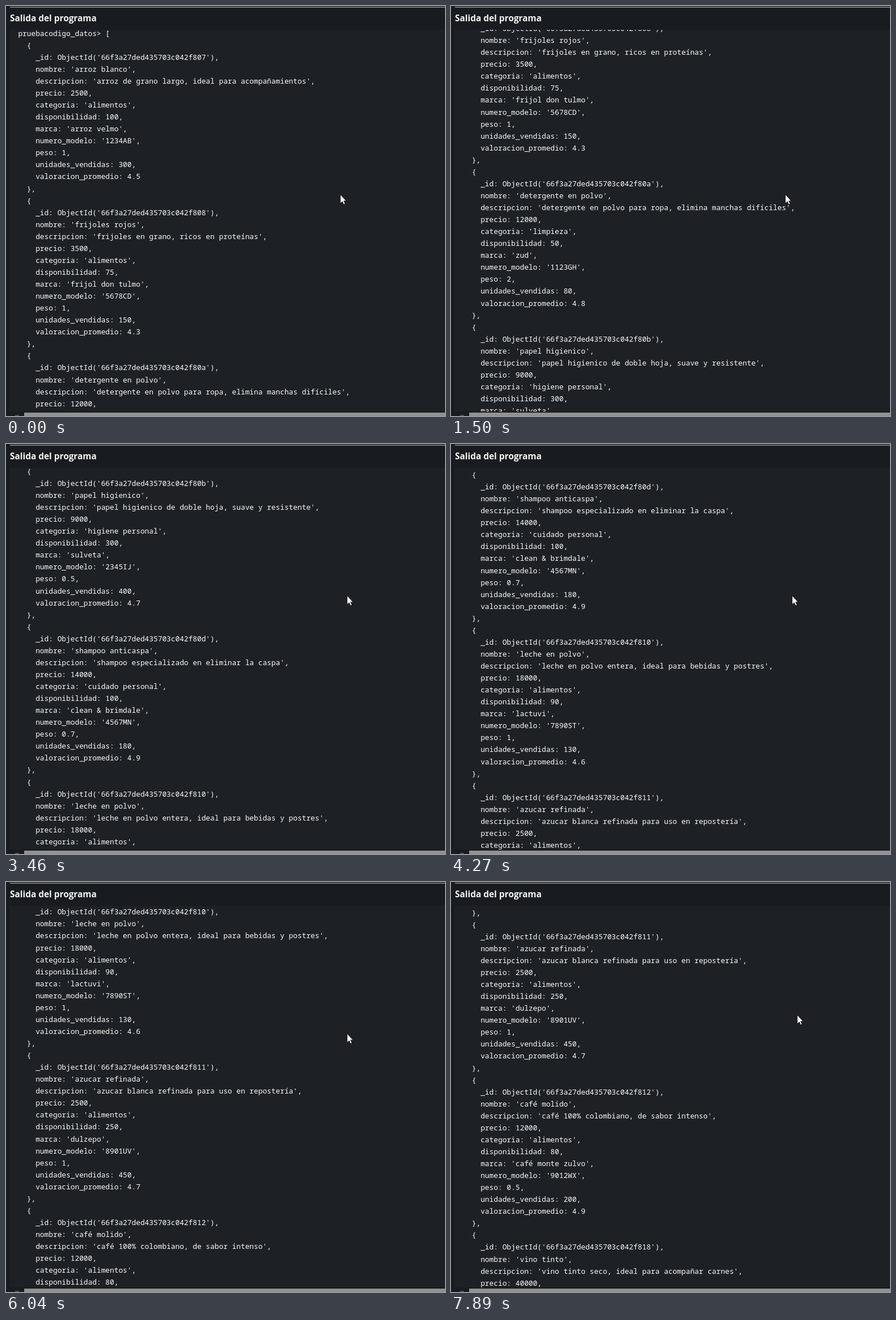
An HTML page for the animation above (8000 ms loop, 774 by 723 pixels).

```html
<!DOCTYPE html>
<html lang="es">
<head>
<meta charset="utf-8">
<style>
  html, body { margin: 0; width: 100%; height: 100%; overflow: hidden; background: #181b1f; }
  body { position: relative; }
  body > * { position: absolute; }
  #rule { left: 7px; right: 0; top: 1px; height: 1px; background: #8d9090; border-top: 1px solid #55595a; }
  h1 { margin: 0; left: 7px; top: 10px; font: 700 15.4px/24px "Open Sans", "Noto Sans", sans-serif; color: #f4f4f4; white-space: nowrap; }
  #output { left: 6px; right: 0; top: 42px; height: 673px; overflow: hidden; background: #1d2125; }
  pre { position: absolute; left: 15.4px; margin: 0; font: 500 12.84px/21.06px "Noto Sans Mono", monospace; color: #fbfbfb; }
  #thumb { left: 32px; right: 0; top: 717px; bottom: 0; background: #919191; }
  #arrow { left: 16px; top: 721px; width: 7px; height: 2px; background: #4c4f52; }
  #cursor { left: 0; top: 0; overflow: visible; }
</style>
</head>
<body>
<div id="rule"></div>
<h1>Salida del programa</h1>
<div id="output"><pre id="log"></pre></div>
<div id="arrow"></div>
<div id="thumb"></div>
<svg id="cursor" width="12" height="19">
  <path d="M0 0V15.5L3.6 12.2L6 17.6L8.4 16.5L6.1 11.3H10.4Z" fill="#fff" stroke="#111" stroke-width=".8"/>
</svg>
<script>
const DURATION = 8000;
const TICKS = 60;        // picture refreshes per loop
const CLOCK_LEAD = 8;    // ms by which refreshes run ahead of the page clock

const fields = ['nombre', 'descripcion', 'precio', 'categoria', 'disponibilidad', 'marca',
  'numero_modelo', 'peso', 'unidades_vendidas', 'valoracion_promedio'];

// Each row: id ending, then the values of the fields above.
const products = [
  ['07', 'arroz blanco', 'arroz de grano largo, ideal para acompañamientos', 2500, 'alimentos', 100, 'arroz velmo', '1234AB', 1, 300, 4.5],
  ['08', 'frijoles rojos', 'frijoles en grano, ricos en proteínas', 3500, 'alimentos', 75, 'frijol don tulmo', '5678CD', 1, 150, 4.3],
  ['0a', 'detergente en polvo', 'detergente en polvo para ropa, elimina manchas difíciles', 12000, 'limpieza', 50, 'zud', '1123GH', 2, 80, 4.8],
  ['0b', 'papel higienico', 'papel higienico de doble hoja, suave y resistente', 9000, 'higiene personal', 300, 'sulveta', '2345IJ', 0.5, 400, 4.7],
  ['0d', 'shampoo anticaspa', 'shampoo especializado en eliminar la caspa', 14000, 'cuidado personal', 100, 'clean & brimdale', '4567MN', 0.7, 180, 4.9],
  ['10', 'leche en polvo', 'leche en polvo entera, ideal para bebidas y postres', 18000, 'alimentos', 90, 'lactuvi', '7890ST', 1, 130, 4.6],
  ['11', 'azucar refinada', 'azucar blanca refinada para uso en repostería', 2500, 'alimentos', 250, 'dulzepo', '8901UV', 1, 450, 4.7],
  ['12', 'café molido', 'café 100% colombiano, de sabor intenso', 12000, 'alimentos', 80, 'café monte zulvo', '9012WX', 0.5, 200, 4.9],
  ['18', 'vino tinto', 'vino tinto seco, ideal para acompañar carnes', 40000, 'bebidas']
];

const quote = value => typeof value === 'string' ? `'${value}'` : value;
const formatProduct = ([id, ...values]) => {
  const lines = values.map((value, i) => `    ${fields[i]}: ${quote(value)}`);
  return ['  {', [`    _id: ObjectId('66f3a27ded435703c042f8${id}')`, ...lines].join(',\n'), '  }'].join('\n');
};

const log = document.getElementById('log');
const cursor = document.getElementById('cursor');
log.textContent = 'pruebacodigo_datos> [\n' + products.map(formatProduct).join(',\n');

const progress = (tick, start, length) => Math.min(1, Math.max(0, (tick - start) / length));
const easeOut = p => 1 - (1 - p) ** 1.37;

// Four turns of the mouse wheel, timed in ticks; the loop cuts the last one short.
const glides = [
  { start: 5.88, length: 10.12, distance: 524 },
  { start: 21.37, length: 10.63, distance: 586 },
  { start: 38.78, length: 10.22, distance: 410 },
  { start: 56.78, length: 10.22, distance: 410 }
];
const scrollAt = tick => glides.reduce((sum, { start, length, distance }) =>
  sum + distance * easeOut(progress(tick, start, length)), 0);

function cursorAt(tick) {
  const first = progress(tick, 20, 2);
  const second = progress(tick, 53, 3);
  return [589.5 + 12 * first + 9 * second, 332.5 - 65 * first - 33 * second];
}

function draw(now) {
  const tick = Math.floor((now + CLOCK_LEAD) * TICKS / DURATION) % TICKS;
  const [x, y] = cursorAt(tick);
  log.style.top = `${-4.3 - scrollAt(tick)}px`;
  cursor.style.transform = `translate(${x}px, ${y}px)`;
  requestAnimationFrame(draw);
}
draw(0);
</script>
</body>
</html>
```
